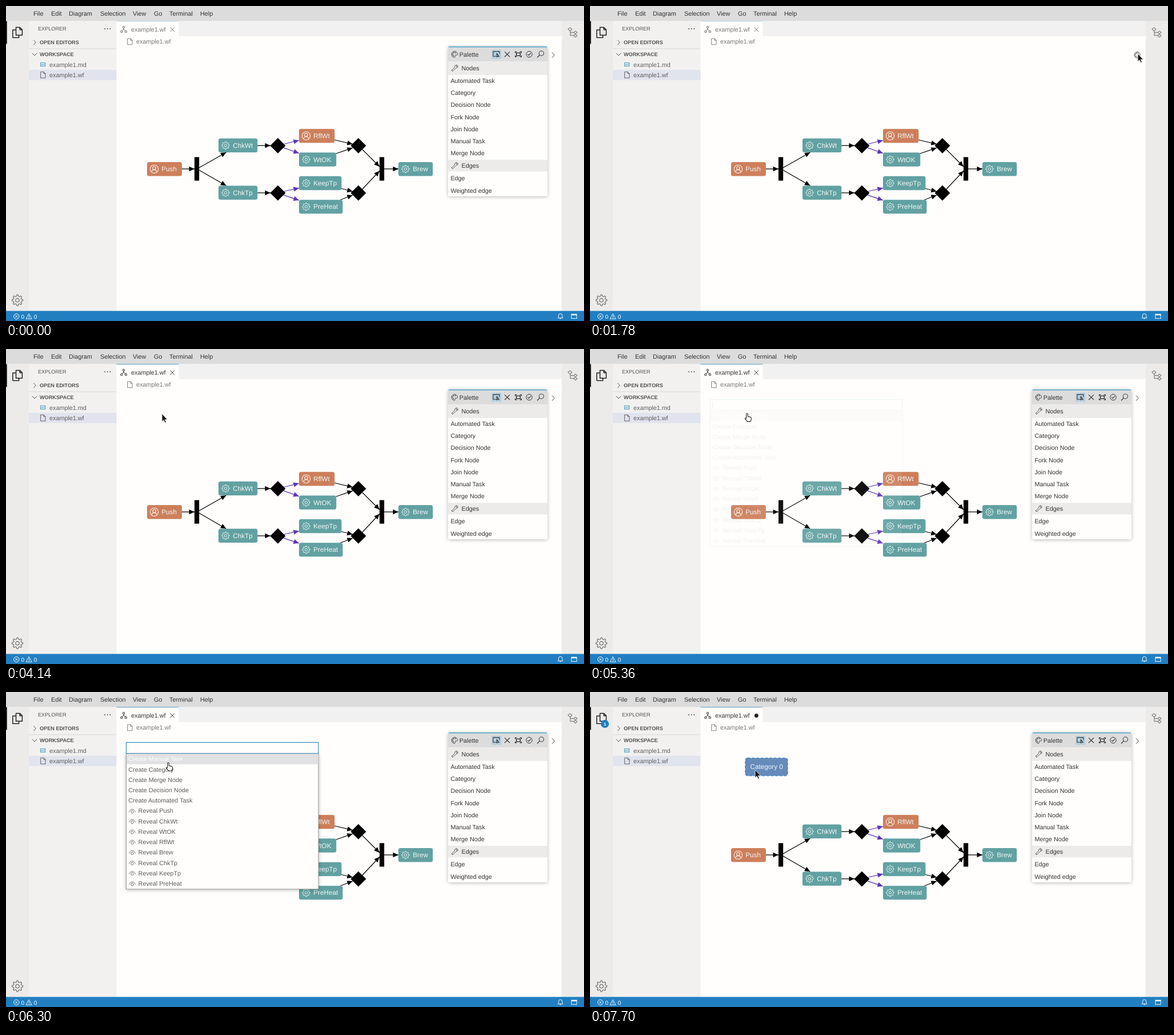
Write an HTML page that moves like this. It is 1012 px wide and 553 px high and loops after 8 s.

```html
<!DOCTYPE html>
<html lang="en">
<head>
<meta charset="utf-8">
<title>Workflow editor</title>
<style>
html, body { margin: 0; width: 100%; height: 100%; overflow: hidden; background: #fffefd; }
svg { display: block; width: 100vw; height: 100vh; }
text { font-family: "Liberation Sans", Arial, sans-serif; text-rendering: geometricPrecision; white-space: pre; }
.line { fill: none; stroke-linecap: round; stroke-linejoin: round; }
.shadow { filter: drop-shadow(0 1px 3px rgba(0, 0, 0, .28)); }
</style>
</head>
<body>
<svg id="stage" viewBox="0 0 1012 553" preserveAspectRatio="none"></svg>
<script>
const LOOP = 8000;
const TEAL = '#62a1a2', CORAL = '#cd7f5b', PURPLE = '#5a35b4';

// Drawing helpers; text is placed by the middle of its capitals.
const rect = (x, y, w, h, fill, more = '') =>
  `<rect x="${x}" y="${y}" width="${w}" height="${h}" fill="${fill}" ${more}/>`;
const text = (x, y, s, fill = '#333', size = 10.8, more = '') =>
  `<text x="${x}" y="${y + size * .35}" font-size="${size}" fill="${fill}" ${more}>${s}</text>`;
const line = (d, color = '#333', w = 1, more = '') =>
  `<path class="line" d="${d}" stroke="${color}" stroke-width="${w}" ${more}/>`;
const at = (x, y, body, more = '') => `<g transform="translate(${x} ${y})" ${more}>${body}</g>`;
const ring = (r, color, w = 1, y = 0) =>
  `<circle cy="${y}" r="${r}" fill="none" stroke="${color}" stroke-width="${w}"/>`;
const dot = (x, y, r, fill) => `<circle cx="${x}" cy="${y}" r="${r}" fill="${fill}"/>`;

function gear(r, color, w) {
  const pts = [];
  for (let i = 0; i < 32; i++) {
    const a = (i - .5) * Math.PI / 16, k = i % 4 < 2 ? r : r * .74;
    pts.push((k * Math.cos(a)).toFixed(2) + ' ' + (k * Math.sin(a)).toFixed(2));
  }
  return line('M' + pts.join('L') + 'Z', color, w) + ring(r * .33, color, w);
}

const cross = (r, color, w = 1) => line(`M${-r} ${-r}L${r} ${r}M${r} ${-r}L${-r} ${r}`, color, w);
const user = ring(7.2, '#fbeee8', 1.1) + ring(2.7, '#fbeee8', 1.1, -1.8) +
  line('M-4.6 5.2C-4 .2 4 .2 4.6 5.2', '#fbeee8', 1.1);
const file = color => line('M-4-5.3H1.2L4-2.5V5.3H-4ZM1-5.2V-2.3H4', color, .9);
const wrench = line('M-5.4 3.6L-.4-1.3C-1-4 1.4-6 3.9-5.2L1.9-3.1L3.1-1.9L5.2-3.9C6-1.4 4-.9 1.3.4L-3.6 5.3Q-5 6.2-5.4 3.6Z', '#444', .9);
const brush = line('M0-5.3A5.3 5.3 0 1 0 .6 5.3C2.3 4.8-.3 2.6 1.4 1.6C3 1 5.3 2.4 5.4-.2C5.2-3.2 2.8-5.3 0-5.3Z', '#333', .9) +
  dot(-3, -.4, .9, '#333') + dot(-1.5, -2.9, .9, '#333') + dot(1.5, -2.9, .9, '#333') + dot(-2, 2.4, .9, '#333');
const eye = line('M-5.4 1.6C-3.8-4.6 3.8-4.6 5.4 1.6', '#666', .9) + ring(2.3, '#666', .9, 1.6);

function node(x, y, w, label, manual) {
  return rect(x, y, w, 24.4, manual ? CORAL : TEAL, 'rx="3.5"') +
    at(x + 12.5, y + 12.2, manual ? user : gear(6.7, '#e6f3f2', 1)) +
    text(x + 25.3, y + 12.2, label, '#f2f6f5', 11.7);
}

function arrow(x1, y1, x2, y2, color = '#000') {
  const turn = Math.atan2(y2 - y1, x2 - x1) * 180 / Math.PI;
  return line(`M${x1} ${y1}L${x2} ${y2}`, color, 1.25, 'style="stroke-linecap:butt"') +
    `<path d="M0 0L-9.5-4.2V4.2Z" fill="${color}" transform="translate(${x2} ${y2}) rotate(${turn})"/>`;
}

const diamond = (x, y) => `<path d="M${x - 13.5} ${y}l13.5-13.5l13.5 13.5l-13.5 13.5z"/>`;

function frameUi() {
  const menu = [['File', 48], ['Edit', 79], ['Diagram', 110], ['Selection', 165], ['View', 222],
    ['Go', 259], ['Terminal', 286], ['Help', 340]];
  return rect(0, 0, 1012, 553, '#fffefd') +
    rect(0, 0, 1012, 26.5, '#dddcdc') + menu.map(([s, x]) => text(x, 13, s)).join('') +
    rect(0, 26.5, 40, 509, '#ecebea') + rect(0, 26.5, 1.6, 40, '#000') +
    at(20, 46.5, line('M-2.5-9H4.4L8.4-5V4.8H-2.5ZM4.2-9V-4.8H8.4M-2.5-4.6H-8.2V9H2.6V4.8', '#222', 1.5)) +
    at(20, 516.5, gear(9.6, '#777', 1.3)) +
    rect(40, 26.5, 153.4, 509, '#f2f1f0') +
    text(56, 40, 'EXPLORER', '#555', 9.13) +
    [173, 177.7, 182.4].map(x => dot(x, 40, .95, '#444')).join('') +
    line('M48.5 60L52.3 64L48.5 68', '#555') + text(59, 64, 'OPEN EDITORS', '#555', 9.13, 'font-weight="bold"') +
    rect(40, 74.5, 153.4, 1, '#d9d8d8') +
    line('M46 83L50 87L54 83', '#555') + text(59, 85, 'WORKSPACE', '#555', 9.13, 'font-weight="bold"') +
    rect(60.5, 99.7, 8.3, 6, 'none', 'stroke="#4a9ab8" stroke-width="1"') +
    line('M62.4 104V101.8L63.6 103.2L64.8 101.8V104M66.9 101.5V104', '#4a9ab8', .8) +
    text(76, 102.8, 'example1.md', '#606060') +
    rect(40, 112, 153.4, 18.2, '#e1e3ed') + at(65, 121, file('#555')) + text(76, 121, 'example1.wf', '#606060') +
    rect(193.4, 26.5, 780, 26.5, '#f2f1f1') + rect(193.4, 26.5, 109, 27, '#fffefd') +
    rect(193.4, 26.2, 109, 1.1, '#b5cfde', 'id="tabEdge"') +
    `<g id="tabIcon" stroke="#666">` + at(206, 41, `<g fill="none" stroke-width="1"><circle cy="-3.8" r="1.7"/><circle cx="-3.7" cy="4" r="1.7"/><circle cx="3.9" cy="4" r="1.7"/><path d="M0-2V0L-3 2.5M0 0L3.2 2.5"/></g>`) + '</g>' +
    text(219, 41, 'example1.wf', '#777', 10.8, 'id="tabName"') +
    `<g id="tabClose" stroke="#777">${at(291.3, 41.3, '<path d="M-3.6-3.6L3.6 3.6M3.6-3.6L-3.6 3.6"/>')}</g>` +
    `<g id="dirty">${dot(291.3, 41.5, 3.4, '#222')}</g>` +
    at(217, 62.5, file('#777')) + text(228, 62.5, 'example1.wf', '#777') +
    rect(973, 26.5, 39, 509, '#ecebea') +
    at(992, 46.5, line('M-8-6L-4.5-8.6L-1-5.6L-4.6-2.6ZM-4-2.8V5H2M-4 0H2M2 0L5-2.6L8 0L5 2.6ZM2 5.4L5 3L8 5.6L5 8.2Z', '#888', 1.3)) +
    rect(0, 535.3, 1012, 18, '#217fc1') +
    at(18.2, 545, ring(4.7, '#fff', .9) + cross(1.9, '#fff', .9)) + text(26.6, 545, '0', '#fff', 10) +
    at(40.3, 545, line('M0-4.6L4.9 4.2H-4.9ZM0-1.5V1.4M0 2.7V2.8', '#fff', .9)) + text(48.8, 545, '0', '#fff', 10) +
    at(970.7, 544.6, line('M-4.3 3H4.3L3.2 1.2V-1.4A3.2 3.2 0 0 0-3.2-1.4V1.2ZM-1.2 3.4A1.2 1.2 0 0 0 1.2 3.4', '#fff', .9)) +
    rect(990, 541, 9.2, 7.6, 'none', 'stroke="#fff" stroke-width=".9"') + rect(990, 541, 9.2, 2, '#fff') +
    `<g id="badge">${dot(26, 56, 7.1, '#217fc1')}${text(23.9, 56.2, '1', '#fff', 7.6, 'font-weight="bold"')}</g>`;
}

function diagram() {
  return arrow(308, 286, 330, 286) + arrow(338, 284, 385.5, 257) + arrow(338, 288, 385.5, 315.5) +
    [245, 328].map(y => arrow(440, y, 463, y)).join('') +
    arrow(486, 242.5, 513, 236, PURPLE) + arrow(486, 248.8, 513, 258.5, PURPLE) +
    arrow(486, 325.5, 513, 319.5, PURPLE) + arrow(486, 331.8, 513, 341, PURPLE) +
    arrow(575, 235, 607, 242.6) + arrow(578, 259, 607, 249) +
    arrow(587, 320.5, 607, 325.5) + arrow(585, 340.5, 607, 332) +
    arrow(624, 252, 654, 282) + arrow(624, 321.5, 654, 289.5) + arrow(662, 286, 687, 286) +
    rect(330, 265.3, 8.2, 41.3, '#000') + rect(654, 265.3, 8.2, 41.3, '#000') +
    [476, 617].map(x => diamond(x, 245.2) + diamond(x, 328.2)).join('') +
    node(247, 274, 61, 'Push', true) + node(372, 232.6, 68.3, 'ChkWt') + node(372, 315.6, 68.3, 'ChkTp') +
    node(513, 215.8, 62.3, 'RflWt', true) + node(513, 257.3, 65.3, 'WtOK') +
    node(513, 298.8, 74.5, 'KeepTp') + node(513, 340.2, 76.5, 'PreHeat') + node(687, 274, 60.3, 'Brew') +
    '<g id="category">' + rect(272, 116, 74, 31, '#668bba', 'rx="4" stroke="#4b8ac8" stroke-width="1.5" stroke-dasharray="5 2.6"') +
    text(280.6, 131.3, 'Category 0', '#f2f5f9', 11.7) + '</g>';
}

function toolPalette() {
  const items = ['Automated Task', 'Category', 'Decision Node', 'Fork Node', 'Join Node', 'Manual Task', 'Merge Node'];
  const group = (y, h, s) => rect(774, y - h / 2, 174, h, '#ecebea') + at(786, y, wrench) + text(797.5, y, s);
  const tools = rect(850.5, 77, 16.5, 15.5, '#b4cddd') +
    at(858.5, 84.5, line('M-.5 3.8H-5.6V-4.6H5.4V-.5M.8-1.2V5L2.3 3.7L4.8 4.2Z', '#333', 1.1)) +
    at(877.5, 84.8, cross(4.2, '#333', 1.1)) +
    at(897, 84.7, line('M-5.4-2.6V-4.4H-3.2M3.2-4.4H5.4V-2.6M5.4 2.6V4.4H3.2M-3.2 4.4H-5.4V2.6M-3.4-2.4H3.4V2.4H-3.4Z', '#222', 1.3)) +
    at(916, 84.7, ring(5.2, '#333') + line('M-2.5.2L-.7 2L2.6-1.8', '#333', 1.1)) +
    at(936, 84.4, '<circle cx="1.4" cy="-1.3" r="4.1" fill="none" stroke="#333"/>' + line('M-1.6 1.7L-5.6 5.6', '#333', 1.2));
  return '<clipPath id="palClip"><rect id="clipBox" x="774" y="71" width="174" height="263" rx="3"/></clipPath>' +
    '<g id="palette"><g class="shadow"><rect id="palBack" x="774" y="71" width="174" height="263" rx="3" fill="#fffefd"/></g>' +
    '<g clip-path="url(#palClip)">' + rect(774, 71, 174, 26, '#dcdcdc') + at(785.2, 84.8, brush) + text(793.8, 84.8, 'Palette') +
    `<g id="tools">${tools}</g>` + group(109, 24, 'Nodes') +
    items.map((s, i) => text(778.4, 131.5 + 21.1 * i, s)).join('') +
    group(280.2, 20.5, 'Edges') + text(778.4, 302.3, 'Edge') + text(778.4, 324, 'Weighted edge') +
    `<g id="scroll">${rect(939.7, 72, 8.3, 263, '#fffefd')}<rect id="thumb" x="939.7" y="71" width="8.3" height="0" fill="#c1c0c0"/></g>` +
    rect(774, 71, 174, 1.4, '#45a1cb') + '</g></g>' +
    line('M956.3 81.8L960.4 86.2L956.3 90.6', '#444', 1, 'id="chevron"') +
    at(958, 86, brush, 'id="brush"');
}

function commands() {
  const create = ['Manual Task', 'Category', 'Merge Node', 'Decision Node', 'Automated Task'].map(s => 'Create ' + s);
  const reveal = ['Push', 'ChkWt', 'WtOK', 'RflWt', 'Brew', 'ChkTp', 'KeepTp', 'PreHeat'].map(s => 'Reveal ' + s);
  const rows = create.concat(reveal).map((s, i) => {
    const y = 117.6 + 18.22 * i, isCreate = i < create.length;
    return (i < 2 ? rect(211, y - 9.1, 335.5, 18.2, '#e1e0e2', `id="row${i}"`) : '') +
      (isCreate ? '' : at(221, y, eye)) +
      text(isCreate ? 214.3 : 231.6, y, s, i ? '#5c5c5c' : '#fffefd', 10.8, `id="cmd${i}"`);
  });
  return '<g id="commands">' + rect(210.5, 107.5, 336.5, 238.5, '#fffefd', 'class="shadow" stroke="#999" stroke-width="1"') +
    rows.join('') + rect(210.5, 88.5, 336.5, 19.3, '#fffefd', 'stroke="#3f88b3" stroke-width="1.2"') +
    rect(214, 92, 1, 13, '#333', 'id="caret"') + '</g>';
}

const pointer = '<g id="cursor"><path id="tip" d="M0-.5V13.5L3.1 10.7L5.3 15.5L7.5 14.5L5.4 9.9H9.6Z" fill="#181818" stroke="#fff" stroke-width=".8"/>' +
  '<path id="hand" d="M.7 7V.3a1.3 1.3 0 0 1 2.6 0V4.6Q8.6 4.8 9.3 6.6V9.6L8 13.4H2.6L-1.6 8.4Q-1 6.6.7 8Z" fill="#fff" stroke="#222" stroke-width="1.1" stroke-linejoin="round"/></g>';

document.getElementById('stage').innerHTML = frameUi() + diagram() + toolPalette() + commands() + pointer;

const $ = id => document.getElementById(id);
const show = (id, on) => $(id).setAttribute('visibility', on ? 'visible' : 'hidden');
const set = (id, name, value) => $(id).setAttribute(name, value);
const clamp = v => Math.min(1, Math.max(0, v));

// The CSS "ease" curve.
function ease(p) {
  if (p <= 0 || p >= 1) return clamp(p);
  let lo = 0, hi = 1;
  for (let i = 0; i < 20; i++) {
    const u = (lo + hi) / 2;
    if (.75 * u * (1 - u) + u ** 3 < p) lo = u; else hi = u;
  }
  return .3 * lo * (1 - lo) ** 2 + 3 * lo * lo * (1 - lo) + lo ** 3;
}

// time, x, y
const path = [[500, 1004, 96], [700, 980, 93], [920, 959, 84], [3320, 959, 84], [3500, 790, 116], [3720, 480, 145],
  [3900, 325, 138], [4060, 277, 117], [4140, 273, 114], [6180, 273, 114], [6300, 282, 125], [6400, 287, 132],
  [6520, 287, 132], [6540, 289, 137]];

function cursorAt(t) {
  const i = path.findIndex(k => k[0] > t);
  if (i < 0) return path[path.length - 1].slice(1);
  if (i === 0) return path[0].slice(1);
  const a = path[i - 1], b = path[i], p = (t - a[0]) / (b[0] - a[0]);
  return [a[1] + (b[1] - a[1]) * p, a[2] + (b[2] - a[2]) * p];
}

function paletteHeight(t) {
  const full = 263, max = 500;
  if (t < 1380) return full;
  const open = t < 2900 ? 1 - ease((t - 1370) / 400) : ease((t - 2912) / 300);
  return Math.min(full, max * open);
}

function draw(t) {
  const [x, y] = cursorAt(t), hand = t >= 5360 && t < 7480;
  show('cursor', t >= 500);
  set('cursor', 'transform', `translate(${x} ${y})`);
  show('tip', t >= 500 && !hand);
  show('hand', hand);

  const h = paletteHeight(t), cut = h < 262.5, closed = t >= 1380 && t < 2920;
  set('palette', 'display', h < .5 ? 'none' : 'inline');
  set('clipBox', 'height', h);
  set('palBack', 'height', h);
  set('thumb', 'height', h * h / 263);
  show('scroll', cut);
  show('thumb', cut);
  set('tools', 'transform', `translate(${cut ? -8.3 : 0} 0)`);
  show('chevron', !closed);
  show('brush', closed);

  const active = t >= 4120, dirty = t >= 7500;
  set('tabEdge', 'fill', active ? '#5d9fc2' : '#b5cfde');
  set('tabName', 'fill', active ? '#333' : '#777');
  set('tabIcon', 'stroke', active ? '#222' : '#666');
  set('tabClose', 'stroke', active ? '#333' : '#777');
  show('tabClose', !dirty);
  show('dirty', dirty);
  show('category', dirty);
  show('badge', t >= 7660);

  const alpha = clamp((t - 5340) / 300) * clamp((7640 - t) / 300), hover = t >= 6340;
  set('commands', 'opacity', alpha);
  set('commands', 'display', alpha ? 'inline' : 'none');
  show('row1', hover);
  set('cmd1', 'fill', hover ? '#fffefd' : '#5c5c5c');
  show('caret', t < 5940 || t >= 6540 && t < 7120);
}

const start = performance.now();
function tick() {
  draw((performance.now() - start) % LOOP);
  requestAnimationFrame(tick);
}
tick();
</script>
</body>
</html>
```
